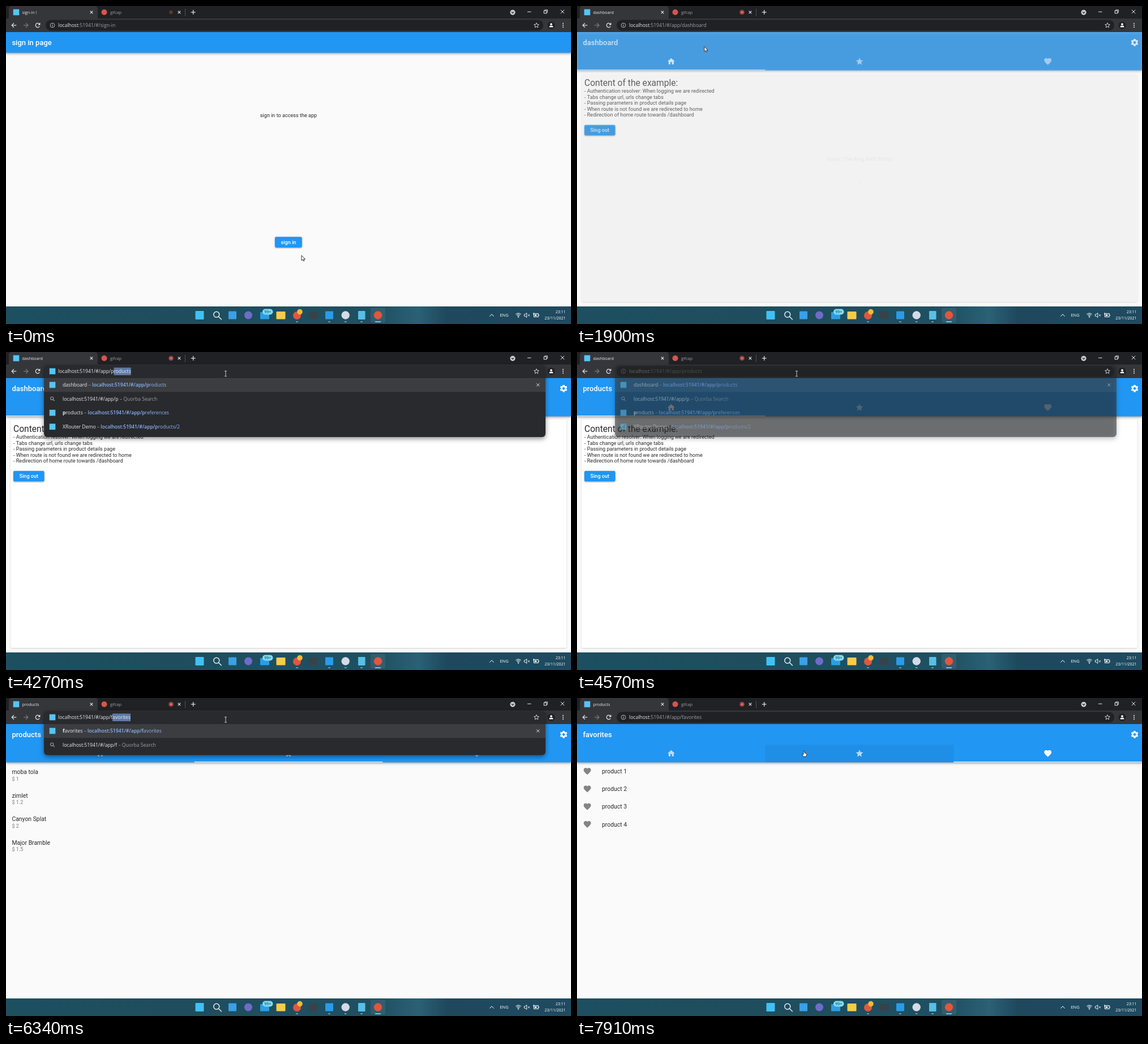
These frames come from a looping animation (998x561 px, 8 s). An HTML page with a canvas:

```html
<!DOCTYPE html>
<html lang="en">
<head>
<meta charset="utf-8">
<title>Router demo</title>
<style>
html, body { margin: 0; width: 100%; height: 100%; overflow: hidden; background: #fafafa; }
canvas { display: block; width: 998px; height: 561px; }
</style>
</head>
<body>
<canvas id="stage"></canvas>
<script>
const W = 998, H = 561, LOOP = 8000;
const canvas = document.getElementById('stage');
const ctx = canvas.getContext('2d');
const dpr = window.devicePixelRatio || 1;
canvas.width = W * dpr;
canvas.height = H * dpr;

const UI = '"Open Sans", "Noto Sans", sans-serif';
const APP = 'Roboto, sans-serif';
const BLUE = '#2196f3', PAGE = '#fafafa', INK = 'rgba(0,0,0,.84)', LIGHT = '#e8eaed', DIM = '#9aa0a6';
const TAB_W = W / 3;

const ICONS = {
  home: new Path2D('M10 20v-6h4v6h5v-8h3L12 3 2 12h3v8z'),
  star: new Path2D('M12 17.27L18.18 21l-1.64-7.03L22 9.24l-7.19-.61L12 2 9.19 8.63 2 9.24l5.46 4.73L5.82 21z'),
  heart: new Path2D('M12 21.35l-1.45-1.32C5.4 15.36 2 12.28 2 8.5 2 5.42 4.42 3 7.5 3c1.74 0 3.41.81 4.5 2.09C13.09 3.81 14.76 3 16.5 3 19.58 3 22 5.42 22 8.5c0 3.78-3.4 6.86-8.55 11.54z')
};
const ARROW = new Path2D('M0 0V9L2.1 7.1 3.5 10 5 9.3 3.7 6.5H6.4Z');
const HAND = new Path2D('M-1 .7Q0-.6 1 .7V4L4 4.8Q5 5.2 4.8 6.4L4 10.5H-.8L-3.4 6.8Q-3.4 5.6-2.2 6L-1 7Z');

const STEPS = [[90, 190, 2], [590, 1330, 9], [1430, 1690, 4], [1810, 1980, 3], [2290, 2480, 3],
  [2780, 2980, 2], [3180, 3180, 1], [4270, 4370, 2], [4570, 4570, 1], [4670, 4860, 3],
  [5560, 5650, 2], [6340, 6450, 2], [6630, 6630, 1], [6740, 6920, 3], [7620, 7910, 4]];

const POINTER = [[0, 522, 440], [90, 517, 431], [190, 511, 420], [960, 511, 420], [1690, 391, 97],
  [1980, 156, 61], [2200, 156, 61], [2480, 388, 38], [7540, 388, 38], [7720, 394, 64], [7910, 401, 93]];

const clamp = v => Math.max(0, Math.min(1, v));

function snap(t) {
  let last = 0;
  for (const [a, b, n] of STEPS)
    for (let i = 0; i < n; i++) {
      const s = n > 1 ? a + (b - a) * i / (n - 1) : a;
      if (s <= t) last = s;
    }
  return last;
}

function bezier(x1, y1, x2, y2) {
  const at = (a, b, u) => 3 * a * u * (1 - u) ** 2 + 3 * b * u * u * (1 - u) + u ** 3;
  return x => {
    if (x <= 0 || x >= 1) return clamp(x);
    let lo = 0, hi = 1;
    for (let i = 0; i < 20; i++) {
      const mid = (lo + hi) / 2;
      if (at(x1, x2, mid) < x) lo = mid; else hi = mid;
    }
    return at(y1, y2, lo);
  };
}
const ease = bezier(.25, .1, .25, 1);
const fastSlow = bezier(.4, 0, .2, 1);

function box(x, y, w, h, color, r = 0) {
  ctx.fillStyle = color;
  ctx.beginPath();
  ctx.roundRect(x, y, w, h, r);
  ctx.fill();
}
function disc(x, y, r, color) {
  ctx.fillStyle = color;
  ctx.beginPath();
  ctx.arc(x, y, r, 0, 7);
  ctx.fill();
}
function arc(x, y, r, from, to, color, w) {
  ctx.strokeStyle = color;
  ctx.lineWidth = w;
  ctx.beginPath();
  ctx.arc(x, y, r, from, to);
  ctx.stroke();
}
const ring = (x, y, r, color, w) => arc(x, y, r, 0, Math.PI * 2, color, w);
function line(color, w, ...p) {
  ctx.strokeStyle = color;
  ctx.lineWidth = w;
  ctx.beginPath();
  for (let i = 0; i < p.length; i += 2) ctx.lineTo(p[i], p[i + 1]);
  ctx.stroke();
}
function cross(x, y, r, color, w = 1) {
  line(color, w, x - r, y - r, x + r, y + r);
  line(color, w, x - r, y + r, x + r, y - r);
}
// y is the middle of the line; returns the x where the text ends
function text(s, x, y, size, color, { font = APP, weight = 400, align = 'left' } = {}) {
  ctx.font = `${weight} ${size}px ${font}`;
  ctx.textAlign = align;
  ctx.fillStyle = color;
  ctx.fillText(s, x, y + size * .35);
  return x + ctx.measureText(s).width;
}
const ui = (s, x, y, size, color, weight = 400) => text(s, x, y, size, color, { font: UI, weight });
function icon(name, x, y, color) {
  ctx.save();
  ctx.translate(x, y);
  ctx.scale(.65, .65);
  ctx.translate(-12, -12);
  ctx.fillStyle = color;
  ctx.fill(ICONS[name]);
  ctx.restore();
}
function raised(blur, dy, alpha, draw) {
  ctx.save();
  ctx.shadowColor = `rgba(0,0,0,${alpha})`;
  ctx.shadowBlur = blur * dpr;
  ctx.shadowOffsetY = dy * dpr;
  draw();
  ctx.restore();
}
function withAlpha(a, draw) {
  if (a <= 0) return;
  ctx.save();
  ctx.globalAlpha = a;
  draw();
  ctx.restore();
}

function appBar(title, h) {
  raised(4, 1.4, .4, () => box(0, 46, W, h, BLUE));
  text(title, 10.4, 64.3, 13, '#fff', { weight: 500 });
}
function button(label, x, y, w, glow) {
  raised(2.5, 1, .4, () => box(x, y, w, 18.6, BLUE, 2.4));
  if (glow) box(x, y, w, 18.6, `rgba(255,255,255,${glow})`, 2.4);
  text(label, x + w / 2, y + 9.4, 9.1, '#fff', { weight: 500, align: 'center' });
}
function gear(x, y) {
  ring(x, y, 3.7, '#fff', 2.8);
  for (let i = 0; i < 6; i++) {
    ctx.save();
    ctx.translate(x, y);
    ctx.rotate(i * Math.PI / 3);
    box(-1.6, -6.5, 3.2, 2.6, '#fff', .6);
    ctx.restore();
  }
}

function signInPage(t) {
  box(0, 46, W, 484, PAGE);
  text('sign in to access the app', 499, 192.5, 9.1, INK, { align: 'center' });
  button('sign in', 475, 407.3, 47.8, t >= 590 ? .22 : t >= 190 ? .08 : 0);
  appBar('sign in page', 36.4);
}

function guardPage(t) {
  box(0, 46, W, 484, PAGE);
  text('Guard: Checking Auth Status', 499, 270, 9.1, INK, { align: 'center' });
  const u = Math.max(0, t - 705), f = u / 1333 % 1;
  const head = fastSlow(clamp(f * 2)), tail = fastSlow(clamp(f * 2 - 1));
  const from = Math.PI * (-.5 + tail * 1.5 + u / 1111 + f * .5);
  arc(499.5, 301, 11.7, from, from + Math.max(.02, (head - tail) * 1.5 * Math.PI), BLUE, 2.6);
}

function homeTab() {
  raised(2, .7, .22, () => box(8, 119, 982, 403, '#fff', 2.6));
  text('Content of the example:', 13, 136, 15.6, INK);
  ['Authentication resolver: When logging we are redirected',
    'Tabs change url, urls change tabs',
    'Passing parameters in product details page',
    'When route is not found we are redirected to home',
    'Redirection of home route towards /dashboard'
  ].forEach((s, i) => text('- ' + s, 13, 150.2 + i * 10.4, 9.1, INK));
  button('Sing out', 13, 209.7, 54.6);
}
function productsTab() {
  [['moba tola', 1], ['zimlet', 1.2], ['Canyon Splat', 2], ['Major Bramble', 1.5]].forEach(([name, price], i) => {
    text(name, 10.4, 130.6 + i * 41.5, 10.4, INK);
    text('$ ' + price, 10.4, 142.4 + i * 41.5, 9.1, 'rgba(0,0,0,.5)');
  });
}
function favoritesTab() {
  for (let i = 0; i < 4; i++) {
    const y = 129.2 + i * 31.2;
    icon('heart', 18.2, y, 'rgba(0,0,0,.47)');
    text('product ' + (i + 1), 44, y + .2, 10.4, INK);
  }
}

function appPage(t) {
  box(0, 46, W, 484, PAGE);
  const pos = ease((t - 4570) / 290) + ease((t - 6569) / 290);
  [homeTab, productsTab, favoritesTab].forEach((draw, i) => {
    const dx = (i - pos) * W;
    if (Math.abs(dx) >= W) return;
    ctx.save();
    ctx.translate(dx, 0);
    draw();
    ctx.restore();
  });
  appBar(t < 4570 ? 'dashboard' : t < 6630 ? 'products' : 'favorites', 67.6);
  gear(985, 64.4);
  if (t >= 7720) box(TAB_W, 82.4, TAB_W, 31.2, `rgba(0,0,0,${.05 * clamp((t - 7620) / 200)})`);
  ['home', 'star', 'heart'].forEach((name, i) =>
    icon(name, TAB_W * (i + .5), 97.8, `rgba(255,255,255,${.68 + .32 * clamp(1 - Math.abs(pos - i))})`));
  box(pos * TAB_W, 112.2, TAB_W, 1.4, '#fff');
}

const favicon = (x, y) => box(x - 5.3, y - 5.3, 10.6, 10.6, '#54c5f8');

function magnifier(x, y, r, color, w) {
  ring(x, y, r, color, w);
  line(color, w, x + r * .7, y + r * .7, x + r * 1.8, y + r * 1.8);
}

// mark: [from, to) of the selected characters
function address(path, mark, editing) {
  const full = 'localhost:51941/#/' + path, size = 8.6;
  ctx.font = `400 ${size}px ${UI}`;
  const at = n => 92 + ctx.measureText(full.slice(0, n)).width;
  if (mark) box(at(mark[0]), 27.5, at(mark[1]) - at(mark[0]), 13.4, '#5d7aa6');
  const cuts = [0, 9, ...(mark || []), full.length].sort((a, b) => a - b);
  for (let i = 1; i < cuts.length; i++) {
    const a = cuts[i - 1], b = cuts[i];
    if (a === b) continue;
    const lit = editing || a < 9 || (mark && a >= mark[0] && a < mark[1]);
    ui(full.slice(a, b), at(a), 34, size, lit ? LIGHT : DIM);
  }
}

function popup(path, rows, alpha) {
  const h = rows.length * 24.6 + 28.5;
  withAlpha(alpha, () => {
    raised(8, 3, .45, () => box(67, 23, 886, h, '#292a2d', 6));
    box(67, 46, 886, 24.4, 'rgba(255,255,255,.09)');
    cross(939.7, 58, 2.5, LIGHT);
    rows.forEach(([name, rest, bold], i) => {
      const y = 58 + i * 24.6, key = 'localhost:51941/#/app/' + path[4];
      if (rest === undefined) {
        magnifier(81.2, y - .8, 2.6, DIM, 1.1);
        const x = ui(key, 100, y, 8.6, LIGHT);
        ui(' – ' + name, x, y, 8.6, DIM);
        return;
      }
      favicon(82, y);
      let x = 100;
      if (bold) x = ui(name.slice(0, bold), x, y, 8.6, LIGHT, 700);
      x = ui(name.slice(bold || 0), x, y, 8.6, LIGHT);
      x = ui(' – ', x, y, 8.6, DIM);
      x = ui(key, x, y, 8.6, '#8ab4f8', 600);
      ui(rest, x, y, 8.6, '#8ab4f8');
    });
  });
  if (alpha === 1) {
    favicon(82, 34);
    address(path, [23, 18 + path.length], true);
  }
}

function browser(t) {
  box(0, 0, W, 23, '#202124');
  box(0, 22, W, 24, '#35363a');
  box(5, 0, 157, 24, '#35363a', [5, 5, 0, 0]);
  favicon(18, 11);
  ui(t < 1810 ? 'sign in !' : t < 4670 ? 'dashboard' : 'products', 28.5, 11, 7.25, LIGHT);
  cross(151, 11, 2.3, LIGHT, 1.1);
  disc(173.5, 11, 5, '#d9544d');
  ui('gifcap', 184, 11, 7.25, DIM);
  if (t < 90) disc(291.5, 11, 3.2, '#5b3a2e');
  else {
    disc(291.5, 11, 2.5, '#e8645c');
    ring(291.5, 11, 3.7, '#e8645c', .9);
  }
  cross(306, 11, 2.3, LIGHT, 1.1);
  box(316, 5, .8, 13, '#5a5c60');
  line(LIGHT, 1.2, 326.8, 11, 334.6, 11);
  line(LIGHT, 1.2, 330.7, 7.1, 330.7, 14.9);
  disc(895, 11.3, 4.6, '#c8cacd');
  line('#202124', 1.3, 893, 10.4, 895, 12.6, 897, 10.4);
  line(LIGHT, 1, 921, 10.3, 927.5, 10.3);
  ctx.strokeRect(950.2, 8.3, 4.6, 4.6);
  line(LIGHT, .9, 951.8, 8, 951.8, 6.8, 956.4, 6.8, 956.4, 11.3, 955, 11.3);
  cross(983, 10, 3.2, LIGHT);

  line(LIGHT, 1.2, 18.3, 34, 10.4, 34);
  line(LIGHT, 1.2, 14, 30.1, 10.2, 34, 14, 37.9);
  line('#7b7e83', 1.2, 31, 34, 38.8, 34);
  line('#7b7e83', 1.2, 35.2, 30.1, 39, 34, 35.2, 37.9);
  arc(56, 34, 3.7, .5, 5.6, LIGHT, 1.2);
  ctx.fillStyle = LIGHT;
  ctx.fill(new Path2D('M60.4 29.3v4.2h-4.2z'));

  const focus = (t >= 2780 && t < 4270) || (t >= 5560 && t < 6340);
  box(70, 24.6, 879, 18.8, '#202124', 9.4);
  if (focus) {
    ctx.strokeStyle = '#4b87e8';
    ctx.lineWidth = 1.3;
    ctx.beginPath();
    ctx.roundRect(70.6, 25.2, 877.8, 17.7, 8.9);
    ctx.stroke();
    for (const [x, y] of [[912, 30], [917, 30], [912, 35], [917, 35]]) ctx.strokeRect(x, y, 2.8, 2.8);
    ctx.strokeStyle = LIGHT;
    ctx.lineWidth = 1;
    for (const [x, y] of [[912, 30], [917, 30], [912, 35], [917, 35]]) ctx.strokeRect(x, y, 2.8, 2.8);
  }
  ring(82, 34, 3.9, '#bdc1c6', .9);
  box(81.5, 33.2, 1, 3, '#bdc1c6');
  box(81.5, 31.4, 1, 1.1, '#bdc1c6');

  const path = t < 1810 ? 'sign-in' : 'app/' + (t < 4270 ? 'dashboard' : t < 6340 ? 'products' : 'favorites');
  const all = 18 + path.length;
  let mark = null;
  if (focus && t >= 2980) mark = t < 3180 || (t >= 5560 && t < 5650) ? [0, all] : [22, all];
  address(path, mark, false);

  const p1 = t < 4270 || t >= 4670 ? 0 : t < 4570 ? 1 : .55;
  const p2 = t < 6340 || t >= 6740 ? 0 : t < 6630 ? 1 : .02;
  if (p1) popup(path, [['dashboard', 'roducts'], ['Quorba Search'], ['products', 'references', 1], ['XRouter Demo', 'roducts/2']], p1);
  if (p2) popup(path, [['favorites', 'avorites', 1], ['Quorba Search']], p2);

  ctx.save();
  ctx.translate(937, 34);
  ctx.scale(.43, .43);
  ctx.translate(-12, -12);
  ctx.strokeStyle = LIGHT;
  ctx.lineWidth = 2;
  ctx.stroke(ICONS.star);
  ctx.restore();
  disc(963, 34, 6.6, '#202124');
  disc(963, 32.2, 1.9, '#fff');
  box(959.5, 34.7, 7, 2.9, '#fff', [2.5, 2.5, .5, .5]);
  for (let i = -1; i < 2; i++) disc(984, 34 + i * 3.3, 1, LIGHT);
}

function taskbar() {
  const g = ctx.createLinearGradient(0, 0, W, 0);
  [[0, '#1d4f60'], [.3, '#1f4d5d'], [.66, '#1f5061'], [.73, '#2b6075'], [.78, '#1f485d'], [1, '#1f4a60']]
    .forEach(([o, c]) => g.addColorStop(o, c));
  box(0, 530, W, 31, g);
  box(644, 532.5, 26, 26, 'rgba(255,255,255,.08)', 3);

  box(334.5, 538, 15, 15, '#3fc1f5', 1);
  magnifier(371.8, 544.2, 5, '#e6eef2', 1.5);
  box(393, 538.5, 14, 14, '#3aa0e8', 1);
  disc(428, 545.5, 7, '#6f6bc8');
  box(449, 540, 16, 12.5, '#2b9de6', 1);
  box(453, 534.5, 18.5, 10, '#7fdcf7', 5);
  text('99+', 462.2, 539.6, 6.8, '#10303c', { font: UI, align: 'center' });
  box(477.5, 539, 16, 13.5, '#f6cb4b', 1);
  disc(514, 546, 7, '#e2563f');
  disc(519, 539.6, 4.8, '#f0b93a');
  box(535, 539, 15, 13, '#38424a', 1);
  box(564, 538.5, 14, 14, '#2a9be8', 1);
  disc(599.7, 545.5, 7.2, '#d5dbe6');
  box(622, 538, 12.5, 15, '#58bfe6', 1);
  disc(657, 545.5, 7.2, '#e2563f');
  for (const x of [514, 571, 599.7, 628]) box(x - 2, 556.3, 4, 1.5, '#9fb1ba', .7);
  box(651.7, 556.2, 10.6, 1.7, '#7fd0f2', .8);

  line('#fff', 1, 854.3, 547.6, 858, 543.8, 861.7, 547.6);
  text('ENG', 880, 545.7, 7.4, '#fff', { font: UI, align: 'center' });
  for (const r of [2.6, 4.8, 7]) arc(905, 549, r, -2.3, -.84, '#fff', 1);
  disc(905, 548.7, 1, '#fff');
  ctx.strokeStyle = '#fff';
  ctx.lineWidth = .9;
  ctx.stroke(new Path2D('M915.3 543.9h1.8l2.6-2.4v8l-2.6-2.4h-1.8z'));
  cross(923.4, 545.6, 1.6, '#fff', .9);
  ctx.lineWidth = 1;
  ctx.strokeRect(932.5, 542.6, 7.6, 5.8);
  box(934, 544, 3.2, 3, '#fff');
  box(940.7, 544.2, 1, 2.5, '#fff');
  line('#fff', 1.1, 932, 541, 932, 545);
  text('23:11', 988.5, 540, 7, '#fff', { font: UI, align: 'right' });
  text('23/11/2021', 988.5, 550.6, 7, '#fff', { font: UI, align: 'right' });
}

function pointer(t) {
  let i = 0;
  while (i < POINTER.length - 2 && POINTER[i + 1][0] <= t) i++;
  const [t0, x0, y0] = POINTER[i], [t1, x1, y1] = POINTER[i + 1];
  const k = clamp((t - t0) / (t1 - t0)), x = x0 + (x1 - x0) * k, y = y0 + (y1 - y0) * k;
  if (t > 2300 && y < 46) {
    const c = '#c4c6c9';
    line(c, 1, x, y - 4, x, y + 4.5);
    line(c, 1, x - 2, y - 4.4, x + 2, y - 4.4);
    line(c, 1, x - 2, y + 4.8, x + 2, y + 4.8);
    return;
  }
  const hand = (t >= 190 && t < 780) || (t > 7700 && y > 82);
  ctx.save();
  ctx.translate(x, y);
  ctx.lineWidth = .9;
  ctx.strokeStyle = '#222';
  ctx.fillStyle = '#fff';
  ctx.lineJoin = 'round';
  ctx.fill(hand ? HAND : ARROW);
  ctx.stroke(hand ? HAND : ARROW);
  ctx.restore();
}

function draw(t) {
  ctx.setTransform(dpr, 0, 0, dpr, 0, 0);
  const guard = clamp((t - 640) / 230), app = clamp((t - 1750) / 200);
  if (guard < 1) signInPage(t);
  if (app < 1) withAlpha(guard, () => guardPage(t));
  withAlpha(app, () => appPage(t));
  browser(t);
  taskbar();
  pointer(t);
}

const start = performance.now();
function tick() {
  draw(snap((performance.now() - start) % LOOP));
  requestAnimationFrame(tick);
}
tick();
</script>
</body>
</html>
```
